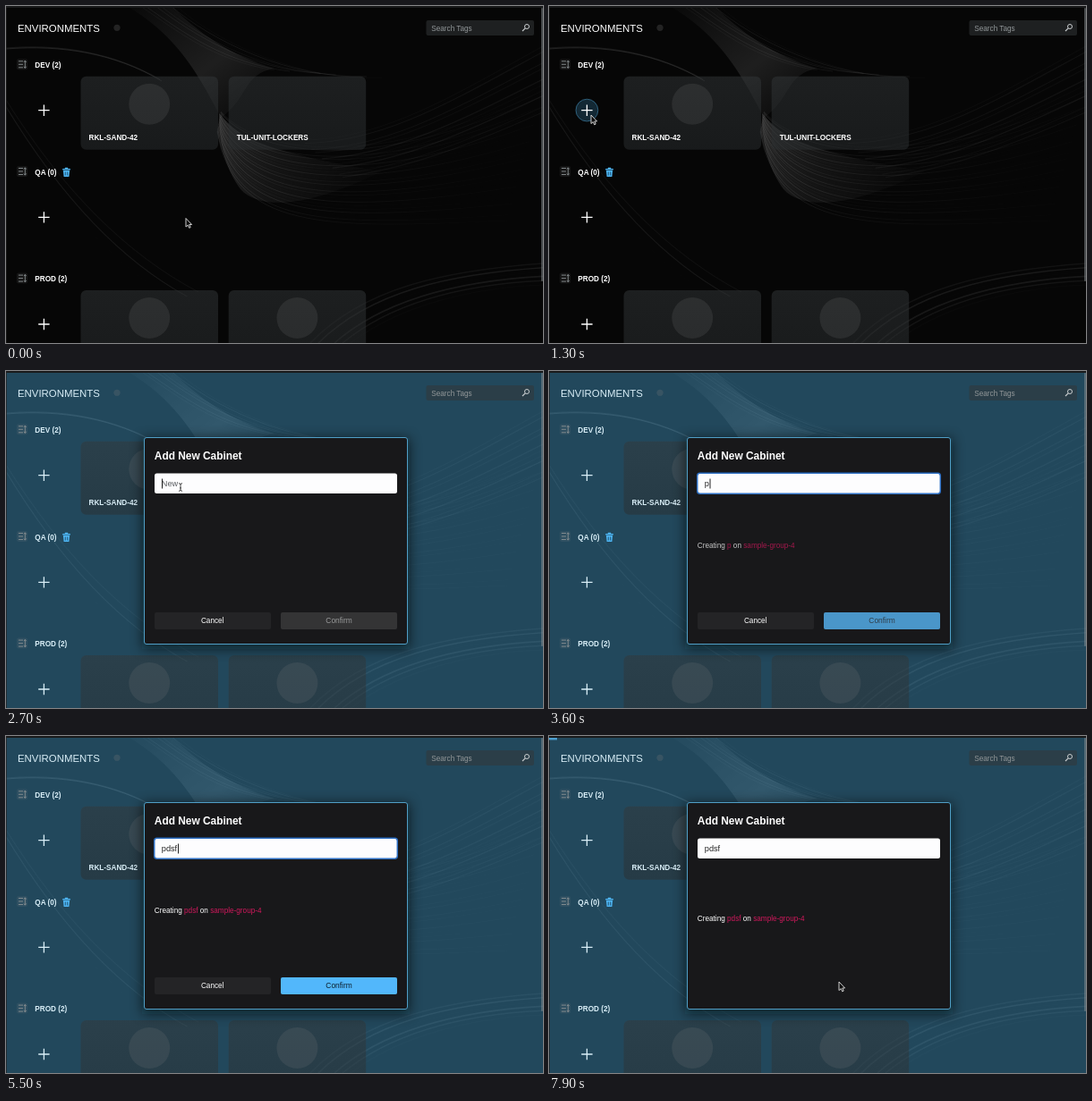
Animation, 600 px wide and 377 px high, one loop 8 s. Source, as an HTML page:

```html
<!DOCTYPE html>
<html lang="en">
<head>
<meta charset="utf-8">
<title>Environments</title>
<style>
html, body { margin: 0; width: 100%; height: 100%; overflow: hidden; background: #050505; }
svg { display: block; width: 100vw; height: 100vh; }
text { font-family: "Liberation Sans", Arial, sans-serif; font-size: 8.2px; white-space: pre; }
.b { font-weight: bold; }
</style>
</head>
<body>
<svg id="stage" viewBox="0 0 600 377" preserveAspectRatio="none">
  <defs>
    <linearGradient id="cardFill" x2="0" y2="1">
      <stop offset="0" stop-color="#34383a" stop-opacity=".5"/>
      <stop offset="1" stop-color="#2b2f31" stop-opacity=".5"/>
    </linearGradient>
    <linearGradient id="beam" x1="0" y1="0" x2="1" y2="1">
      <stop offset="0" stop-color="#fff" stop-opacity=".015"/>
      <stop offset=".55" stop-color="#fff" stop-opacity=".1"/>
      <stop offset="1" stop-color="#fff" stop-opacity="0"/>
    </linearGradient>
    <linearGradient id="fan" x2="1" y2=".2">
      <stop offset="0" stop-color="#fff" stop-opacity=".13"/>
      <stop offset=".45" stop-color="#fff" stop-opacity=".06"/>
      <stop offset="1" stop-color="#fff" stop-opacity=".015"/>
    </linearGradient>
    <filter id="shadow" x="-20%" y="-20%" width="140%" height="140%">
      <feGaussianBlur stdDeviation="7"/>
    </filter>
    <filter id="soft"><feGaussianBlur stdDeviation=".6"/></filter>
  </defs>

  <rect width="600" height="377" fill="#060606"/>
  <g id="waves" fill="none" filter="url(#soft)"></g>
  <rect id="veil" width="600" height="377" fill="#56c0f5" opacity=".36"/>
  <rect width="600" height="2" fill="#191a1b"/>
  <rect width="1" height="377" fill="#222" opacity=".7"/>

  <g id="page">
    <text x="13" y="28.6" style="font-size:11.4px">ENVIRONMENTS</text>
    <circle cx="124" cy="24.3" r="3.6" fill="#787878" opacity=".26"/>
    <rect x="469.5" y="16" width="120.5" height="17" rx="2" fill="#34383a" opacity=".55"/>
    <text x="475.3" y="27.5" fill="#929799">Search Tags</text>
    <g fill="none" stroke="#c9cdcf">
      <circle cx="582" cy="23" r="2.5"/>
      <path d="M580.2 24.9L577 28" stroke-width="1.2"/>
    </g>
    <g id="rows"></g>
    <g fill="#4db4f2">
      <path d="M63.2 182h8.6v1.4h-8.6zM65.8 180.8h3.4v1.3h-3.4zM63.9 184h7.2l-.7 7h-5.8z"/>
      <path d="M66.3 185.6v4M68.7 185.6v4" stroke="#17405a" stroke-width=".8"/>
    </g>
    <circle id="halo" cx="42.4" cy="116.6" r="12.4" fill="#4db4f2" fill-opacity=".2" stroke="#5cbdf2" stroke-opacity=".42"/>
    <g id="pluses" stroke-width="1.3"></g>
  </g>
  <rect x="598" y="2" width="2" height="306" rx="1" fill="#8a9093" opacity=".5"/>

  <g id="modal">
    <rect x="152" y="75" width="299" height="236" fill="#03090d" opacity=".6" filter="url(#shadow)"/>
    <rect x="154.5" y="74.5" width="294" height="231" rx="2.5" fill="#18181a" stroke="#509fc7"/>
    <text class="b" x="165.8" y="98.9" fill="#fff" style="font-size:11.9px">Add New Cabinet</text>
    <rect x="166" y="114.5" width="271" height="22.5" rx="2.5" fill="#fdfdfe"/>
    <rect id="ring" x="165.7" y="114.2" width="271.6" height="23.1" rx="3" fill="none" stroke="#2d6fc4" stroke-width="1.5"/>
    <text id="field" x="173.8" y="129.3" style="font-size:9.2px"></text>
    <rect id="caret" y="120.5" width="1" height="11" fill="#222"/>
    <text id="note" x="165.8" fill="#fff">Creating <tspan id="typed" fill="#d0185c"></tspan> on <tspan fill="#d0185c">sample-group-4</tspan></text>
    <g id="buttons" text-anchor="middle">
      <rect x="166" y="270" width="130" height="19" rx="2" fill="#242426"/>
      <text x="230.7" y="282.4" fill="#fff">Cancel</text>
      <rect x="307" y="270" width="130" height="19" rx="2" fill="#343435"/>
      <text x="372" y="282.4" fill="#98999a" style="font-size:8.4px">Confirm</text>
      <g id="ready">
        <rect x="307" y="270" width="130" height="19" rx="2" fill="#52b7fb"/>
        <text x="372" y="282.4" fill="#0d2130" style="font-size:8.4px">Confirm</text>
      </g>
    </g>
  </g>

  <rect id="progress" y="2" height="2.4" fill="#4d9fd0"/>
  <path id="arrow" d="M0 0V9.6L2.2 7.6L3.7 10.8L5.2 10.1L3.8 7H6.6Z" fill="#0c0c0c" stroke="#e4e4e4" stroke-width=".9"/>
  <path id="beamCursor" d="M-2-4.3Q0-4.3 0-3V3Q0 4.3-2 4.3M2-4.3Q0-4.3 0-3M0 3Q0 4.3 2 4.3M-1 .9H1" fill="none" stroke="#333" stroke-width=".9"/>
</svg>
<script>
const $ = id => document.getElementById(id);
const NS = "http://www.w3.org/2000/svg";

function add(parent, tag, attrs, text) {
  const el = document.createElementNS(NS, tag);
  for (const k in attrs) el.setAttribute(k, attrs[k]);
  if (text) el.textContent = text;
  parent.appendChild(el);
  return el;
}

// A sheaf of fine curves blended between two cubic edges.
function sheaf(a, b, count, stroke, width) {
  for (let i = 0; i < count; i++) {
    const k = count > 1 ? i / (count - 1) : 0;
    const p = a.map((v, j) => (v + (b[j] - v) * k).toFixed(1));
    add($("waves"), "path", {
      d: `M${p[0]} ${p[1]}C${p.slice(2).join(" ")}`, stroke, "stroke-width": width,
      opacity: (0.55 + 0.45 * Math.sin(i * 2.3)).toFixed(2)
    });
  }
}

function buildWaves() {
  const g = $("waves");
  add(g, "path", { d: "M135 0C185 30 210 65 240 125C270 105 265 75 300 70C250 55 215 30 185 0Z", fill: "url(#beam)" });
  add(g, "path", { d: "M238 120C260 150 300 165 420 185C360 215 290 235 262 205C248 185 238 160 238 120Z", fill: "url(#fan)" });
  sheaf([150, 0, 195, 30, 230, 60, 300, 72], [190, 0, 235, 40, 330, 85, 420, 80], 8, "#fff1", 1);
  sheaf([240, 118, 275, 160, 400, 190, 600, 95], [236, 140, 255, 250, 350, 250, 560, 240], 24, "url(#fan)", 1);
  sheaf([330, 150, 420, 150, 500, 100, 600, 45], [380, 195, 450, 185, 520, 160, 600, 125], 14, "#ffffff0d", 1.2);
  sheaf([340, 377, 400, 315, 490, 296, 600, 288], [385, 377, 440, 335, 520, 315, 600, 312], 6, "#ffffff17", 1.6);
  sheaf([0, 47, 60, 42, 120, 52, 172, 82], [0, 48, 62, 43, 122, 53, 174, 84], 2, "#ffffff22", 1);
  sheaf([0, 105, 50, 185, 120, 270, 215, 320], [0, 120, 50, 205, 110, 285, 190, 330], 3, "#ffffff14", 1.2);
}

function buildRow(label, y, names) {
  const g = $("rows");
  add(g, "rect", { x: 12, y: y - 6, width: 12, height: 12, rx: 2, fill: "#888", opacity: 0.12 });
  add(g, "path", {
    d: `M14 ${y - 3.5}h5M14 ${y}h5M14 ${y + 3.5}h5M21.3 ${y - 4}v8M20 ${y - 2.5}l1.3-1.7l1.3 1.7M20 ${y + 2.5}l1.3 1.7l1.3-1.7`,
    fill: "none", stroke: "#8b9194", "stroke-width": 0.9
  });
  add(g, "text", { class: "b", x: 32.3, y: y + 3.5 }, label);
  names.forEach((name, i) => {
    const x = 83.5 + i * 165.2, top = y + 13.5;
    add(g, "rect", { x, y: top, width: 153.5, height: 82, rx: 6, fill: "url(#cardFill)" });
    if (name.logo) add(g, "circle", { cx: x + 76.7, cy: top + 31, r: 23, fill: "#808486", opacity: 0.16 });
    add(g, "text", { class: "b", x: x + 9, y: top + 70.8 }, name.text);
  });
  add($("pluses"), "path", { d: `M36.2 ${y + 51.4}h12.4M42.4 ${y + 45.2}v12.4` });
}

buildWaves();
buildRow("DEV (2)", 65.3, [{ text: "RKL-SAND-42", logo: true }, { text: "TUL-UNIT-LOCKERS" }]);
buildRow("QA (0)", 185, []);
buildRow("PROD (2)", 304.6, [{ text: "", logo: true }, { text: "", logo: true }]);

const clamp = v => Math.max(0, Math.min(1, v));
const ramp = (t, from, to) => clamp((t - from) / (to - from));
const smooth = p => p * p * (3 - 2 * p);
const within = (t, from, to) => t >= from && t < to;
const show = (id, on) => $(id).setAttribute("opacity", +on);

function pointer(t) {
  const mix = (a, b, p) => [a[0] + (b[0] - a[0]) * p, a[1] + (b[1] - a[1]) * p];
  const rest = [47, 122], input = [195, 130];
  if (t < 100) return [201, 237.5];
  if (t < 1800) return mix([122, 193], rest, smooth(ramp(t, 300, 1100)));
  if (t < 6000) return mix(rest, input, smooth(ramp(t, 1800, 2700)));
  return mix(input, [324, 275], 1 - (1 - ramp(t, 6000, 7000)) ** 1.2);
}

// [time, text, caret x]
const keys = [[0, "", 174], [3400, "p", 179.5], [3900, "pd", 184.7], [4600, "pds", 189.2], [4900, "pdsf", 192]];
const caretOn = [[2700, 3200], [3400, 4400], [4600, 5100], [5500, 6100], [6600, 7000]];

function draw(t) {
  const open = t >= 1400;
  const [x, y] = pointer(t);
  const [, value, caretX] = keys.filter(k => t >= k[0]).pop();

  show("veil", open * 0.36);
  show("modal", open);
  $("page").setAttribute("fill", open ? "#d9eef7" : "#fff");
  $("pluses").setAttribute("stroke", open ? "#d9eef7" : "#fff");
  show("halo", t < 2200 && Math.hypot(x - 42.4, y - 116.6) < 13);

  $("field").textContent = value || "New";
  $("field").setAttribute("fill", value ? "#222" : "#5a5d60");
  show("caret", caretOn.some(([a, b]) => within(t, a, b)));
  $("caret").setAttribute("x", caretX);
  show("ring", t < 7000 ? ramp(t, 2600, 3200) * (t >= 2800) : 0);

  $("typed").textContent = value;
  show("note", ramp(t, 3300, 3700));
  $("note").setAttribute("y", t < 7200 ? 198 : 207.3);
  show("ready", ramp(t, 3300, 3700));
  show("buttons", t < 7200);
  $("progress").setAttribute("width", t < 7200 ? 0 : 3 + 6 * ramp(t, 7700, 7900));

  const overInput = x > 166 && x < 437 && y > 114 && y < 137;
  const visible = !within(t, 3400, 6100);
  show("arrow", visible && !overInput);
  show("beamCursor", visible && overInput);
  for (const id of ["arrow", "beamCursor"]) $(id).setAttribute("transform", `translate(${x} ${y})`);
}

const start = performance.now();
function tick() {
  draw(Math.floor(((performance.now() - start) % 8000) / 100) * 100);
  requestAnimationFrame(tick);
}
tick();
</script>
</body>
</html>
```
